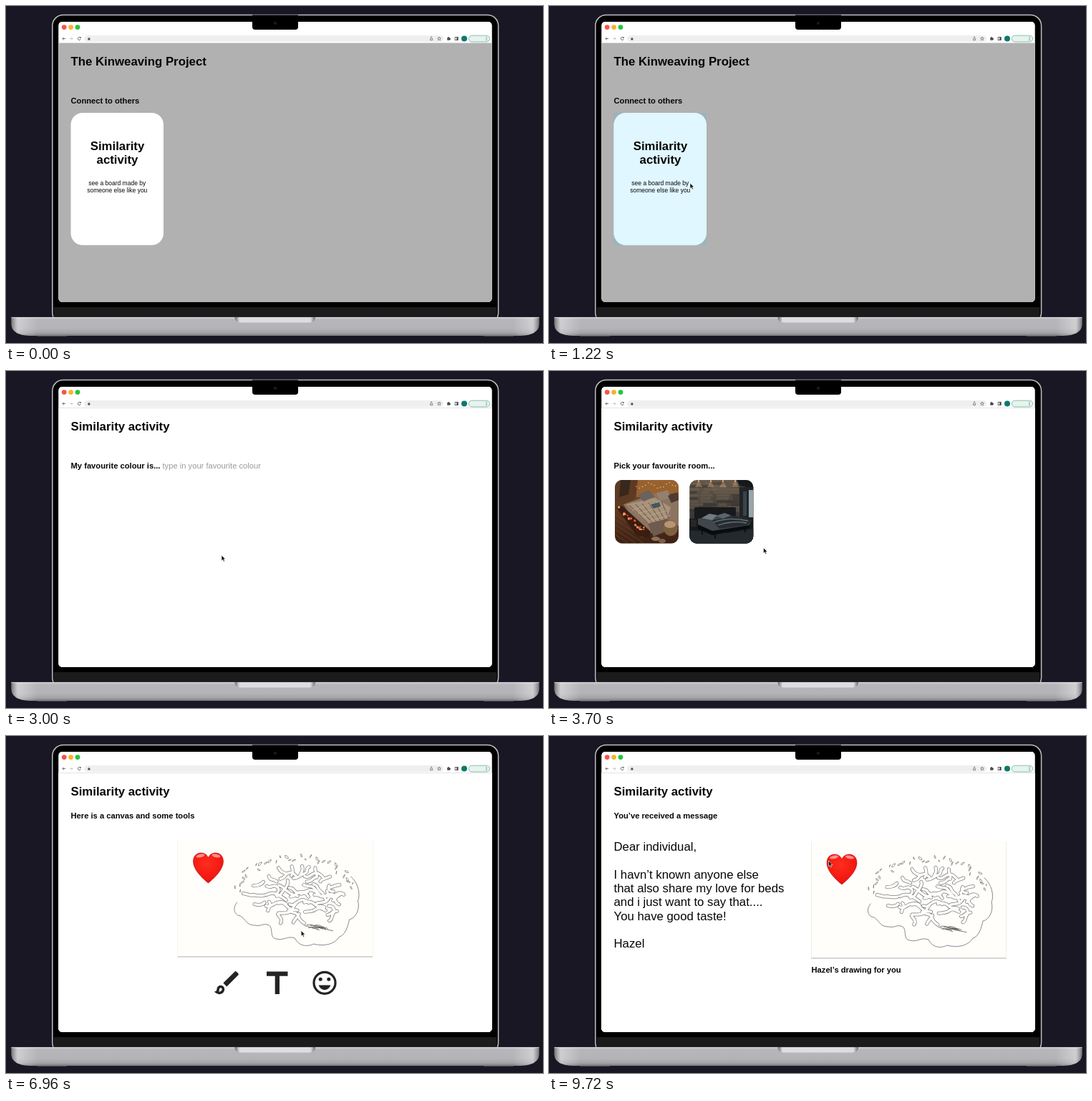
These frames come from a looping animation (750 by 470 pixels, 9.74 s). An HTML page:

```html
<!DOCTYPE html>
<html lang="en">
<head>
<meta charset="utf-8">
<title>Similarity activity</title>
<style>
  html, body { margin: 0; width: 100%; height: 100%; overflow: hidden; background: #191724; }
  svg { display: block; width: 100vw; height: 100vh; }
  text { font-family: "Liberation Sans", Arial, sans-serif; font-size: 11.2px; white-space: pre; }
  .b { font-weight: bold; }
  .l { font-size: 16.8px; }
  .s { font-size: 8.5px; }
  .m { text-anchor: middle; }
</style>
</head>
<body>
<svg viewBox="0 0 750 470" xmlns="http://www.w3.org/2000/svg">
  <defs>
    <clipPath id="screen"><rect x="73.5" y="22" width="605" height="391" rx="5"/></clipPath>
    <clipPath id="cosy"><rect x="92" y="152" width="89" height="88.5" rx="10"/></clipPath>
    <clipPath id="dark"><rect x="196.3" y="152" width="89" height="88.5" rx="10"/></clipPath>
    <linearGradient id="metal" x2="0" y2="1">
      <stop offset="0" stop-color="#c6c5c9"/><stop offset=".15" stop-color="#b6b5ba"/>
      <stop offset=".6" stop-color="#b4b3b8"/><stop offset=".85" stop-color="#a3a2a7"/>
      <stop offset="1" stop-color="#78777c"/>
    </linearGradient>
    <linearGradient id="sheen">
      <stop offset="0" stop-color="#333" stop-opacity=".5"/><stop offset=".012" stop-color="#fff" stop-opacity=".35"/>
      <stop offset=".05" stop-color="#fff" stop-opacity="0"/><stop offset=".95" stop-color="#fff" stop-opacity="0"/>
      <stop offset=".988" stop-color="#fff" stop-opacity=".35"/><stop offset="1" stop-color="#333" stop-opacity=".5"/>
    </linearGradient>
    <linearGradient id="lip">
      <stop offset="0" stop-color="#6c6b70"/><stop offset=".06" stop-color="#dddce0"/>
      <stop offset=".94" stop-color="#dddce0"/><stop offset="1" stop-color="#6c6b70"/>
    </linearGradient>
    <linearGradient id="warm" x2="0" y2="1">
      <stop offset="0" stop-color="#80502c"/><stop offset="1" stop-color="#3b2014"/>
    </linearGradient>
    <linearGradient id="wood" x2="0" y2="1">
      <stop offset="0" stop-color="#67594b"/><stop offset=".45" stop-color="#413d39"/><stop offset="1" stop-color="#1b2125"/>
    </linearGradient>
    <radialGradient id="red" cx=".45" cy=".35" r=".75">
      <stop offset="0" stop-color="#ff2d20"/><stop offset=".7" stop-color="#f2170f"/><stop offset="1" stop-color="#cf0d10"/>
    </radialGradient>
    <g id="art">
      <g id="brain" fill="none" stroke-linecap="round" stroke-linejoin="round"></g>
      <path fill="url(#red)" stroke="#a81218" stroke-width=".6" d="M409 207C400 200 388 188 388 177C388 169 393 165 399 165C404 165 407.5 168 409 172C410.5 168 414 165 419 165C425 165 430 169 430 177C430 188 418 200 409 207Z"/>
      <ellipse cx="398" cy="169" rx="6" ry="2.2" fill="#fff" opacity=".5" transform="rotate(-12 398 169)"/>
      <ellipse cx="420" cy="169" rx="6" ry="2.2" fill="#fff" opacity=".5" transform="rotate(12 420 169)"/>
    </g>
  </defs>

  <rect width="750" height="470" fill="#191724"/>
  <rect x="64.8" y="12.5" width="622.8" height="430" rx="15" fill="#000" stroke="#bfc0c2" stroke-width="1.5"/>
  <rect x="66.5" y="420" width="619" height="14" fill="#1b1b1c"/>

  <g clip-path="url(#screen)">
    <rect x="73" y="22" width="606" height="391" fill="#fff"/>
    <g id="pages"></g>
    <g id="bar"></g>
  </g>

  <path d="M344 12.5h64v16.5q0 4-4 4h-56q-4 0-4-4z" fill="#000"/>
  <circle cx="376" cy="24" r="2.3" fill="#12131c"/><circle cx="376" cy="24" r=".9" fill="#22243a"/>
  <path d="M43 458h42v3h-42zM667 458h42v3h-42z" fill="#4a4a4d"/>
  <g id="base"></g>
  <path d="M7.5 434.4H744.5" stroke="#e4e3e6" stroke-width=".8"/>
  <path d="M319.5 434h112.5q0 7.5-9 7.5h-94.5q-9 0-9-7.5z" fill="url(#lip)"/>

  <path id="cursor" d="M0 0V7.7L1.8 6.1L3 8.9L4.4 8.3L3.2 5.6H5.6Z" fill="#111" stroke="#fff" stroke-width=".6"/>
</svg>

<script>
const LOOP = 9740, FADE = 300;
const $ = id => document.getElementById(id);

let seed = 11;
const rnd = () => (seed = seed * 16807 % 2147483647) / 2147483647;
const jit = n => (rnd() - .5) * 2 * n;

const text = (x, y, s, cls = '', fill = '#060606') =>
  `<text x="${x}" y="${y}" class="${cls}" fill="${fill}">${s}</text>`;
const rect = (x, y, w, h, fill, more = '') =>
  `<rect x="${x}" y="${y}" width="${w}" height="${h}" fill="${fill}" ${more}/>`;
const dot = (x, y, r, fill) => `<circle cx="${x}" cy="${y}" r="${r}" fill="${fill}"/>`;
const oval = (x, y, rx, ry, fill) => `<ellipse cx="${x}" cy="${y}" rx="${rx}" ry="${ry}" fill="${fill}"/>`;
const shape = (d, fill) => `<path d="${d}" fill="${fill}"/>`;
const line = (d, stroke, w) => `<path d="${d}" fill="none" stroke="${stroke}" stroke-width="${w}"/>`;
const times = (n, f) => Array.from({ length: n }, (_, i) => f(i)).join('');

const title = text(90.5, 82.5, 'Similarity activity', 'b l');
const sheet = (x, y) =>
  rect(x - .5, y + 1, 273, 164, '#000', 'opacity=".08"') +
  rect(x, y + 1, 272, 163.5, '#000', 'opacity=".12"') +
  rect(x, y, 272, 163, '#fffefb');

function base() {
  const body = 'M7.5 434H744.5V444Q744 459 718 460H34Q8 459 7.5 444Z';
  return shape(body, 'url(#metal)') + shape(body, 'url(#sheen)');
}

function toolbar() {
  const ink = '#4a4d50';
  return rect(73, 22, 606, 29.5, '#fff') + rect(73, 51, 606, .8, '#dcdcdd') +
    dot(81.2, 29.6, 3.4, '#f4554d') + dot(90.6, 29.6, 3.4, '#fbb02d') + dot(100, 29.6, 3.4, '#2ac23b') +
    rect(109, 41, 502, 9, '#eeeff0', 'rx="4.5"') +
    line('M83 45.5H79M80.8 43.6L78.9 45.5L80.8 47.4', ink, .8) +
    line('M89 45.5H93M91.2 43.6L93.1 45.5L91.2 47.4', '#b9bbbd', .8) +
    line('M104 44.3A2 2 0 1 0 104.3 46M104.4 43V44.5H102.9', ink, .8) +
    rect(114.4, 45.1, 3, 2.3, ink, 'rx=".4"') + line('M115.2 45V44.5a.7 .7 0 0 1 1.4 0V45', ink, .5) +
    line('M592.6 44.9V47.7H595.6V44.9M594.1 46.4V42.8M593.1 43.7L594.1 42.7L595.1 43.7', ink, .6) +
    line('M605 43L605.7 44.6L607.4 44.8L606.1 46L606.5 47.7L605 46.8L603.5 47.7L603.9 46L602.6 44.8L604.3 44.6Z', ink, .6) +
    rect(616.2, 44, 3.8, 3.8, ink, 'rx=".5"') + dot(618, 43.8, .9, ink) + dot(620.2, 46, .9, ink) +
    rect(627.2, 43.4, 4, 4.2, 'none', `stroke="${ink}" stroke-width=".8"`) + rect(629.3, 43.2, 2, 4.6, ink) +
    dot(640, 45.5, 4, '#0d7a6b') +
    rect(646.3, 41.2, 29.4, 8.8, '#e6f3ee', 'rx="4.4" stroke="#5fa58f" stroke-width=".7"') +
    times(3, i => dot(671, 43.6 + i * 1.9, .6, '#1f6b58'));
}

function homePage() {
  return rect(73, 51, 606, 362, '#b1b1b1') +
    text(90.5, 82.5, 'The Kinweaving Project', 'b l') +
    text(90.5, 136, 'Connect to others', 'b') +
    rect(90.5, 149, 129.5, 184.5, '#fff', 'rx="16.5"') +
    `<g id="hover">${rect(90.5, 149, 129.5, 184.5, '#9db3bc')}${rect(90.5, 149, 129.5, 184.5, '#e0f7ff', 'rx="16.5"')}</g>` +
    text(155.5, 201, 'Similarity', 'b l m') + text(155.5, 220, 'activity', 'b l m') +
    text(155.3, 249.5, 'see a board made by', 's m') + text(155.3, 259.5, 'someone else like you', 's m');
}

function colourPage() {
  return title + text(90.5, 136, 'My favourite colour is...', 'b') +
    text(218.5, 136, 'type in your favourite colour', '', '#9a9a9a');
}

function cosyRoom() {
  return rect(92, 152, 89, 89, 'url(#warm)') +
    shape('M92 152H124L120 178L92 192Z', '#5d3a22') + shape('M124 152H181V170L122 176Z', '#98622f') +
    shape('M100 152H114L111 172L98 176Z', '#38271c') +
    times(7, i => line(`M92 ${200 + i * 7}L132 ${226 + i * 7}`, '#6f4326', .8)) +
    shape('M104 186L150 170L181 180V216L142 226L116 205Z', '#8b7461') +
    shape('M108 186L148 177L170 190L165 206L138 213Z', '#a9927b') +
    shape('M138 213L165 206L176 218L146 231Z', '#6e5a4e') +
    times(6, i => line(`M${112 + i * 9} ${187 - i}L${138 + i * 6} ${212 - i}`, '#77614f', 1.2)) +
    times(4, i => line(`M${116 + i * 8} ${194 + i * 5}L${152 + i * 6} ${183 + i * 6}`, '#c2ab91', .7)) +
    shape('M124 173L139 166L148 175L132 182Z', '#6b625c') + shape('M150 170L166 166L170 177L155 181Z', '#93806f') +
    shape('M166 174L179 169L181 180L171 184Z', '#4d3b31') + shape('M142 186L154 183L156 189L146 192Z', '#45565d') +
    shape('M94 190L102 188L142 224L140 233L122 229Z', '#3a1d11') +
    times(20, () => { const p = rnd(); return dot(97 + p * 40, 193 + p * 32 + jit(4), .8 + rnd(), rnd() > .4 ? '#f3a069' : '#e4572f'); }) +
    times(14, i => dot(122 + i * 4.2, 160 + Math.sin(i) * 3 + jit(2), .8, '#f6b878')) +
    oval(170, 219, 10, 11, '#80613f') + oval(169, 214, 8, 5, '#b69673') +
    oval(149, 234, 6, 3, '#8d7159') + oval(158, 237, 5, 3, '#7d6049');
}

function darkRoom() {
  const plank = () => rnd() > .5 ? '#766756' : '#2e2c2a';
  return rect(196, 152, 90, 89, 'url(#wood)') +
    times(40, i => rect(192 + (i % 4) * 20 + jit(6), 155 + (i >> 2) * 4.2, 18, 3.6, plank(), 'opacity=".4"')) +
    times(4, i => shape(`M${209 + i * 17} 153L${204 + i * 17} 162H${214 + i * 17}Z`, 'rgba(235,185,125,.35)') + dot(209 + i * 17, 153.5, 1, '#ffdca8')) +
    shape('M262 152H286V164L266 160Z', '#16191b') + rect(266, 162, 20, 44, '#202427') +
    rect(271, 168, 5, 34, '#39444a') + rect(279, 166, 6, 38, '#98a5aa') +
    rect(196, 206, 90, 35, '#14191c') + shape('M196 222L250 226L286 220V241H196Z', '#23292d') +
    rect(203, 190, 58, 16, '#17191b', 'rx="1.5"') + rect(198, 207, 8, 10, '#2c2622') +
    shape('M208 206L244 200L283 208L279 216L228 224L208 215Z', '#3f474b') +
    shape('M228 208L260 202L284 208L277 215L238 220Z', '#262c30') +
    line('M230 211Q252 203 278 209M236 215Q256 208 276 212', '#69747a', 1.3) +
    shape('M213 205L224 199L235 201L228 208Z', '#717c82') + shape('M233 202L245 198L254 201L243 206Z', '#59656b') +
    shape('M208 214L228 223L280 215V219L228 229L208 220Z', '#090c0e') +
    line('M214 220V228M232 228V234M274 219V225', '#07090a', 1.5);
}

function roomsPage() {
  return title + text(90.5, 136, 'Pick your favourite room...', 'b') +
    `<g clip-path="url(#cosy)">${cosyRoom()}</g><g clip-path="url(#dark)">${darkRoom()}</g>`;
}

function canvasPage() {
  const ink = '#242424';
  return title + text(90.5, 115, 'Here is a canvas and some tools', 'b') + sheet(240, 144) +
    `<path transform="translate(287.4 322.8) scale(1.78)" fill="${ink}" fill-rule="evenodd" d="M7 14c-1.66 0-3 1.34-3 3 0 1.31-1.16 2-2 2 .92 1.22 2.49 2 4 2 2.21 0 4-1.79 4-4 0-1.66-1.34-3-3-3zM7 16c.55 0 1 .45 1 1 0 1.1-.9 2-2 2-.17 0-.33-.02-.5-.05.31-.55.5-1.21.5-1.95 0-.55.45-1 1-1zM20.7 4.63l-1.34-1.34a1 1 0 0 0-1.41 0L9 12.25 11.75 15l8.96-8.96c.39-.39.39-1.02 0-1.41z"/>` +
    shape('M364 328.5H393.5V334.8H382V360H375.7V334.8H364Z', ink) +
    `<circle cx="445" cy="344.3" r="15" fill="none" stroke="${ink}" stroke-width="3.2"/>` +
    dot(439.2, 339.3, 2.5, ink) + dot(450.8, 339.3, 2.5, ink) +
    shape('M436.7 347.5H453.3C452 351.5 448.8 354 445 354S438 351.5 436.7 347.5Z', ink);
}

function kindPage() {
  return title + text(90.5, 115, 'What are some kind things you would like to say to them?', 'b') +
    text(90.5, 160, 'Type in some kind words', 'l', '#adadad');
}

function messagePage() {
  const lines = ['Dear individual,', '', 'I havn’t known anyone else', 'that also share my love for beds',
    'and i just want to say that....', 'You have good taste!', '', 'Hazel'];
  return title + text(90.5, 115, 'You’ve received a message', 'b') +
    lines.map((s, i) => text(90.5, 160 + i * 19.3, s, 'l')).join('') +
    sheet(366.5, 146) + '<use href="#art"/>' +
    text(366.5, 330, 'Hazel’s drawing for you', 'b');
}

// Folds are wide gray strokes hollowed out by narrower paper-coloured ones.
function brain() {
  let folds = '', ticks = '';
  for (let gy = 186; gy < 266; gy += 12.5) {
    for (let gx = 456; gx < 614; gx += 17) {
      const x = gx + jit(4), y = gy + jit(3), u = (x - 532) / 84, v = (y - 226) / 50;
      const r = Math.hypot(u, v);
      if (r > .9 || (y > 248 && (x < 490 || x > 530))) continue;
      const steps = r > .6 ? 2 : 4;
      let a = r > .6 ? Math.atan2(v, u) + Math.PI + jit(.6) : jit(.6);
      let px = x, py = y;
      folds += `M${x} ${y}`;
      for (let k = 0; k < steps; k++) {
        const cx = px + Math.cos(a) * 5, cy = py + Math.sin(a) * 4;
        a += jit(1.2);
        px = cx + Math.cos(a) * 3;
        py = cy + Math.sin(a) * 3;
        folds += `Q${cx} ${cy} ${px} ${py}`;
      }
    }
  }
  for (let i = 0; i < 34; i++) {
    const a = 3.3 + i * .083, k = .96 + rnd() * .18;
    const x = 531 + 80 * k * Math.cos(a), y = 224 + 51 * k * Math.sin(a), dx = jit(5), dy = 2 + rnd() * 3;
    ticks += `M${x} ${y}q${dx} 0 ${dx} ${dy}q${-dx - 1} 0 ${-dx} ${-dy}`;
  }
  const edge = 'M449 234C442 243 446 252 454 253C462 258 462 266 474 266C484 268 486 262 494 266C500 270 494 284 504 285C514 288 520 280 530 284C536 296 548 296 556 292C572 296 586 292 592 282C600 280 604 268 606 258C616 256 621 242 618 232C622 222 618 206 608 198';
  const scribble = times(9, i => `M${544 + i * 2.5} ${267 + jit(3)}q${9 + jit(3)} ${jit(4)} ${17 + jit(3)} ${2 + jit(4)}`);
  return line(folds, '#7d7d7d', 5) + line(folds, '#fffefb', 3.5) +
    line(edge, '#7d7d7d', .9) + line(ticks, '#707070', .7) + line(scribble, '#444', .7);
}

$('base').innerHTML = base();
$('brain').innerHTML = brain();
$('bar').innerHTML = toolbar();

// Each layer dissolves in over the ones before it.
const layers = [
  [-FADE, homePage()], [1290, colourPage()], [3240, roomsPage()], [4820, canvasPage()],
  [6360, '<use href="#art" x="-126.5" y="-2"/>', true], [7340, kindPage()], [9300, messagePage()]
];
$('pages').innerHTML = layers.map(([, body, clear]) =>
  `<g>${clear ? '' : rect(73, 51, 606, 362, '#fff')}${body}</g>`).join('');
const groups = [...$('pages').children];

// Pointer path: time, x, y
const path = [
  [40, 33, 56], [140, 140, 68], [260, 240, 108], [380, 320, 180], [500, 351, 246.5], [640, 351, 246.5],
  [900, 245, 248], [1120, 197, 247], [1460, 197, 247], [1620, 245, 206], [1920, 306, 142], [2180, 320, 131],
  [2480, 320, 131], [3000, 301, 257], [3300, 301, 257], [3560, 299.5, 246.5], [3760, 299.5, 246.5],
  [4180, 229, 246.5], [4240, 229, 246.5], [4660, 173.5, 192.5], [4800, 173.5, 192.5], [5360, 352.5, 229.5],
  [5700, 352.5, 229.5], [5900, 352.5, 290], [6340, 352.5, 290], [6720, 396.5, 282.5], [6860, 396.5, 282.5],
  [7100, 437.5, 253.5], [7400, 437.5, 253.5], [8240, 234, 141.5], [8340, 234, 141.5], [9240, 390.5, 176],
  [9400, 390.5, 176], [9600, 390.5, 174], [9740, 390.5, 174]
];

const same = (a, b) => a[1] === b[1] && a[2] === b[2];
function slope(i, axis) {
  const a = path[i - 1], b = path[i], c = path[i + 1];
  if (!c || (a && same(a, b)) || same(b, c)) return 0;
  const from = a || b;
  return (c[axis] - from[axis]) / (c[0] - from[0]);
}
function pointer(t, axis) {
  let i = 0;
  while (i < path.length - 2 && path[i + 1][0] <= t) i++;
  const a = path[i], b = path[i + 1], d = b[0] - a[0];
  const p = Math.max(0, Math.min(1, (t - a[0]) / d)), p2 = p * p, p3 = p2 * p;
  return (2 * p3 - 3 * p2 + 1) * a[axis] + (p3 - 2 * p2 + p) * d * slope(i, axis) +
    (3 * p2 - 2 * p3) * b[axis] + (p3 - p2) * d * slope(i + 1, axis);
}

const fade = (t, start, span) => {
  const p = Math.max(0, Math.min(1, (t - start) / span));
  return p * p * (3 - 2 * p);
};

const begin = performance.now();
function draw(now) {
  const t = Math.max(0, now - begin) % LOOP;
  layers.forEach(([start], i) => groups[i].setAttribute('opacity', fade(t, start, FADE)));
  $('hover').setAttribute('opacity', fade(t, 930, 250));
  $('cursor').setAttribute('visibility', t < 40 ? 'hidden' : 'visible');
  $('cursor').setAttribute('transform', `translate(${pointer(t, 1)} ${pointer(t, 2)})`);
  requestAnimationFrame(draw);
}
draw(begin);
</script>
</body>
</html>
```
